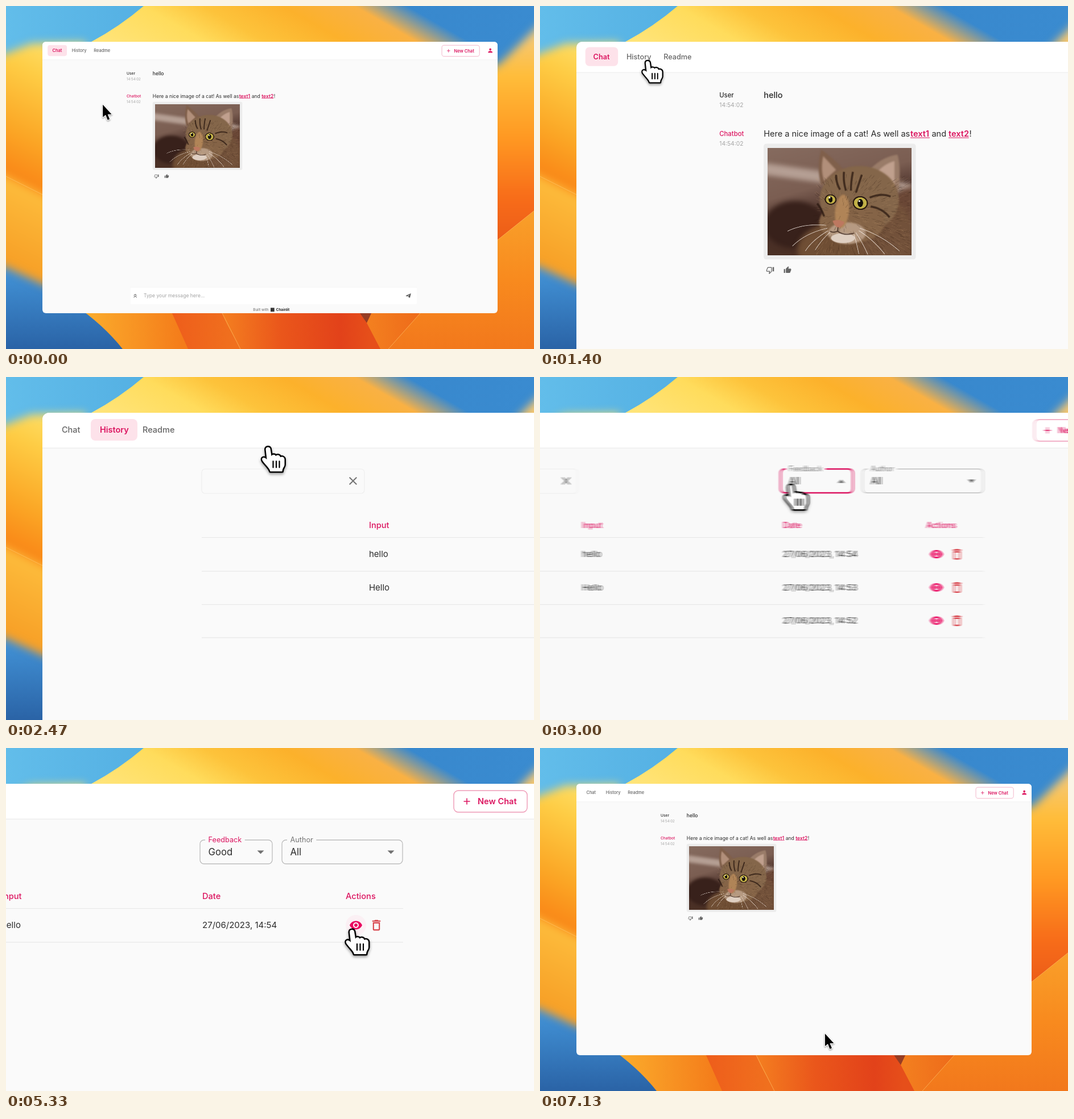
An HTML page with a canvas that plays this animation: 928x604 px, repeating every 7.19 s.

```html
<!DOCTYPE html>
<html lang="en">
<head>
<meta charset="utf-8">
<title>Chat history</title>
<style>
html, body { margin: 0; width: 100%; height: 100%; overflow: hidden; background: #3d8dd3; }
canvas { display: block; width: 928px; height: 604px; }
</style>
</head>
<body>
<canvas id="stage" width="928" height="604"></canvas>
<script>
const W = 928, H = 604, LOOP = 7190, ZOOM = 1.95, PAN = 646;
const PINK = '#dc1560', GREY = '#666', INK = '#2b2b2b', PAPER = '#fafafa';

function surface(w, h) {
  const el = document.createElement('canvas');
  el.width = w;
  el.height = h;
  return el;
}

const out = document.getElementById('stage').getContext('2d');
const layer = surface(W, H);
const c = layer.getContext('2d');

const icons = {
  like: 'M1 21h4V9H1v12zm22-11c0-1.1-.9-2-2-2h-6.31l.95-4.57.03-.32c0-.41-.17-.79-.44-1.06L14.17 1 7.59 7.59C7.22 7.95 7 8.45 7 9v10c0 1.1.9 2 2 2h9c.83 0 1.54-.5 1.84-1.22l3.02-7.05c.09-.23.14-.47.14-.73v-2z',
  dislike: 'M15 3H6c-.83 0-1.54.5-1.84 1.22l-3.02 7.05c-.09.23-.14.47-.14.73v2c0 1.1.9 2 2 2h6.31l-.95 4.57-.03.32c0 .41.17.79.44 1.06L9.83 23l6.59-6.59c.36-.36.58-.86.58-1.41V5c0-1.1-.9-2-2-2zm0 12l-4.34 4.34L12 14H3v-2l3-7h9v10zm4-12h4v12h-4z',
  person: 'M12 12c2.21 0 4-1.79 4-4s-1.79-4-4-4-4 1.79-4 4 1.79 4 4 4zm0 2c-2.67 0-8 1.34-8 4v2h16v-2c0-2.66-5.33-4-8-4z',
  send: 'M22 3 2 12l6 3 10-8-7 9 7 4z',
  eye: 'M12 4.5C7 4.5 2.73 7.61 1 12c1.73 4.39 6 7.5 11 7.5s9.27-3.11 11-7.5c-1.73-4.39-6-7.5-11-7.5zM12 17c-2.76 0-5-2.24-5-5s2.24-5 5-5 5 2.24 5 5-2.24 5-5 5zm0-8c-1.66 0-3 1.34-3 3s1.34 3 3 3 3-1.34 3-3-1.34-3-3-3z',
  bin: 'M6 19c0 1.1.9 2 2 2h8c1.1 0 2-.9 2-2V7H6v12zM8 9h8v10H8V9zm7.5-5l-1-1h-5l-1 1H5v2h14V4z',
  up: 'M6 17.59 7.41 19 12 14.42 16.59 19 18 17.59l-6-6zM6 11l1.41 1.41L12 7.83l4.59 4.58L18 11l-6-6z',
  cross: 'M19 6.4 17.6 5 12 10.6 6.4 5 5 6.4 10.6 12 5 17.6 6.4 19 12 13.4 17.6 19 19 17.6 13.4 12z',
  plus: 'M19 13h-6v6h-2v-6H5v-2h6V5h2v6h6z'
};
for (const k in icons) icons[k] = new Path2D(icons[k]);

const arrowShape = new Path2D('M0 0V22L5 18 8.5 27 12 25.5 8.5 17H15.5Z');
const handShape = new Path2D('M-4 4C-4-1 3-1 4 3L6 16C8 12 13 13 13.5 16 16 13 21 14 21.5 18 25 16 29 18 29 22V31C29 35 25 37 25 43H4C3 38-2 34-9 25-13 19-7 16-2 22Z');

function ramp(g, x0, y0, x1, y1, ...stops) {
  const r = g.createLinearGradient(x0, y0, x1, y1);
  for (const [p, col] of stops) r.addColorStop(p, col);
  return r;
}

function shape(g, d, fill) {
  g.fillStyle = fill;
  g.fill(new Path2D(d));
}

// ---- wallpaper ----
function makeWallpaper() {
  const el = surface(W, H), g = el.getContext('2d');
  g.fillStyle = ramp(g, 0, 0, W, 0, [0, '#62bdea'], [.3, '#52aee2'], [.75, '#3888cd'], [1, '#3a8bd0']);
  g.fillRect(0, 0, W, 300);
  g.fillStyle = ramp(g, 0, 460, 0, H, [0, '#4394d8'], [1, '#2a63a6']);
  g.fillRect(0, 300, W, 304);

  g.filter = 'blur(8px)';
  shape(g, 'M-60 110L0 84 45 66 140 64V520L64 490 0 460-60 440Z',
    ramp(g, 144, 92, -48, 477, [0, '#fde06a'], [.15, '#fecd45'], [.4, '#fba625'],
      [.58, '#f98516'], [.581, '#fdbc3c'], [1, '#f5961f']));
  shape(g, 'M980-10L922 48 870 100 800 140V700H980Z',
    ramp(g, 0, 50, 0, 410, [0, '#f5c877'], [.2, '#ffbd3a'], [.5, '#ff9922'], [.8, '#f76c19'], [1, '#ec5d18']));
  g.filter = 'none';

  shape(g, 'M242 0Q200 36 150 63L140 80H820V0Z',
    ramp(g, 9.9, -17.4, 173.6, -303.8, [0, '#ffe57c'], [.3, '#ffdc5c'], [.46, '#fdc33b'],
      [.67, '#fcb12b'], [.86, '#f9b144'], [1, 'rgba(240,180,90,0)']));

  shape(g, 'M120 526Q172 562 205 604H760V526Z', ramp(g, 140, 0, 310, 0, [0, '#fbac2c'], [1, '#f47c1a']));
  shape(g, 'M285 526L296 550 320 604H760V526Z', ramp(g, 290, 0, 400, 0, [0, '#ee5d1b'], [1, '#f0701e']));
  shape(g, 'M374 526L388 560 412 604H760V526Z', ramp(g, 380, 0, 640, 0, [0, '#f47f20'], [.4, '#ea561b'], [.8, '#e2421a'], [1, '#e64f1a']));
  shape(g, 'M646 526L634 558 658 604H780V526Z', ramp(g, 640, 0, 730, 0, [0, '#f37f1f'], [1, '#ee6a1a']));
  shape(g, 'M618 535L634 558 645 535Z', '#963d24');
  shape(g, 'M940 351L864 412Q790 478 728 541L672 604H940Z',
    ramp(g, 0, 360, 0, H, [0, '#f9a02a'], [.5, '#f88a1e'], [1, '#f2781c']));
  g.strokeStyle = 'rgba(255,200,110,.6)';
  g.stroke(new Path2D('M940 351L864 412Q790 478 728 541L672 604M-4 298L64 332M380 541L412 604'));
  return el;
}

// ---- the photo: soft tones and a few shapes ----
function makePhoto() {
  const k = 2, el = surface(290 * k, 217 * k), g = el.getContext('2d');
  g.scale(k, k);
  let seed = 7;
  const rnd = () => (seed = seed * 16807 % 2147483647) / 2147483647;
  const oval = (x, y, rx, ry, col, a = 0) => {
    g.fillStyle = col;
    g.beginPath();
    g.ellipse(x, y, rx, ry, a, 0, 7);
    g.fill();
  };
  g.fillStyle = ramp(g, 0, 0, 60, 217, [0, '#866b5f'], [.45, '#7b5e52'], [.7, '#4a3029'], [1, '#4b3024']);
  g.fillRect(0, 0, 290, 217);
  g.filter = 'blur(10px)';
  shape(g, 'M-20 28L290 72V95L-20 52Z', '#b59f94');
  oval(55, 155, 62, 48, '#38211b');
  oval(285, 150, 40, 70, '#6a4736');
  oval(175, 205, 115, 62, '#6f4e34');
  oval(240, 175, 55, 70, '#72513a');
  g.filter = 'blur(3px)';
  shape(g, 'M108 3Q98 40 108 76L156 46Q130 18 108 3Z', '#80604b');
  shape(g, 'M262 13Q228 18 202 48L264 88Q270 40 262 13Z', '#9a7c69');
  shape(g, 'M112 16Q106 45 114 66L138 44Z', '#b18f7a');
  shape(g, 'M256 26Q234 32 218 52L256 74Z', '#c0a08e');
  oval(185, 104, 80, 68, '#84664a');
  oval(170, 150, 66, 42, '#856447');
  oval(160, 172, 38, 22, '#b69a82');
  oval(150, 128, 14, 34, '#b08457', .1);
  g.filter = 'none';

  g.lineWidth = .8;
  for (let i = 0; i < 650; i++) {
    const x = 100 + rnd() * 185, y = 60 + rnd() * 155, a = Math.atan2(y - 130, x - 150);
    g.strokeStyle = rnd() < .5 ? 'rgba(45,27,18,.28)' : 'rgba(205,165,120,.2)';
    g.beginPath();
    g.moveTo(x, y);
    g.lineTo(x + 8 * Math.cos(a), y + 8 * Math.sin(a));
    g.stroke();
  }

  g.filter = 'blur(1px)';
  g.strokeStyle = 'rgba(42,24,16,.75)';
  g.lineWidth = 4;
  g.stroke(new Path2D('M138 54Q138 70 146 84M154 48Q152 66 158 86M172 48Q168 68 168 86M190 54Q184 72 178 90M206 100Q230 90 248 98M208 118Q232 122 246 140M100 112Q108 122 114 138'));
  g.filter = 'none';

  for (const [x, y, r] of [[127, 104, 9.5], [187, 111, 13]]) {
    oval(x, y, r + 2.5, r + 1, '#2a1a12', .1);
    oval(x, y, r, r * .88, '#c2b047', .1);
    oval(x, y, r * .42, r * .62, '#120d08');
    oval(x - 2, y - 4, 1.8, 1.8, '#f4f2e6');
  }
  g.filter = 'blur(1px)';
  shape(g, 'M131 147Q144 143 155 150Q150 160 142 161Q134 157 131 147Z', '#bd7860');
  oval(152, 182, 24, 10, '#dfcfc2');
  g.strokeStyle = '#3f281d';
  g.lineWidth = 1.8;
  g.stroke(new Path2D('M142 160L141 168Q132 172 126 168M141 168Q154 178 174 172'));
  g.filter = 'none';
  g.strokeStyle = 'rgba(250,240,232,.75)';
  g.lineWidth = 1.1;
  g.stroke(new Path2D('M118 156Q72 152 40 168M120 162Q76 172 50 198M122 167Q90 186 76 208M126 170Q108 186 96 206M186 162Q230 176 266 208M184 167Q212 184 236 214M178 171Q192 192 202 215M174 174Q180 194 184 214'));
  return el;
}

const wallpaper = makeWallpaper(), photo = makePhoto();

// ---- drawing helpers, in zoomed window units ----
function text(s, x, y, size, color, weight = 400) {
  c.font = `${weight} ${size}px Inter, "Liberation Sans", sans-serif`;
  c.fillStyle = color;
  c.fillText(s, x, y + size * .364);
}

function icon(name, x, y, size, color) {
  c.save();
  c.translate(x - size / 2, y - size / 2);
  c.scale(size / 24, size / 24);
  c.fillStyle = color;
  c.fill(icons[name], 'evenodd');
  c.restore();
}

function box(x0, y0, x1, y1, r, fill, stroke, width = 1.2) {
  c.beginPath();
  c.roundRect(x0, y0, x1 - x0, y1 - y0, r);
  if (fill) { c.fillStyle = fill; c.fill(); }
  if (stroke) { c.strokeStyle = stroke; c.lineWidth = width; c.stroke(); }
}

function bar(x0, x1, y, color) {
  c.fillStyle = color;
  c.fillRect(x0, y, x1 - x0, 1.2);
}

function header(page) {
  c.fillStyle = '#fff';
  c.fillRect(0, 0, 1560, 62);
  bar(0, 1560, 61.5, '#ececec');
  const tabs = [['Chat', 34, 18, 84], ['History', 101, 85, 167], ['Readme', 176]];
  for (const [name, x, left, right] of tabs) {
    const on = name === page;
    if (on) box(left, 11, right, 49, 8, '#fde2ea');
    text(name, x, 30, 14.5, on ? PINK : GREY, on ? 600 : 500);
  }
  box(1369, 12, 1498, 50, 8, '#fff', '#ee9ab6', 1.4);
  icon('plus', 1392, 31, 19, PINK);
  text('New Chat', 1411, 31, 14.6, PINK, 600);
  icon('person', 1535, 30, 22, PINK);
}

function messages() {
  text('User', 288.5, 108, 13, INK, 500);
  text('14:54:02', 288.5, 128, 11.8, '#a5a5a5');
  text('hello', 378, 108, 16.7, INK, 500);
  text('Chatbot', 288.5, 185.5, 13, PINK, 500);
  text('14:54:02', 288.5, 205.5, 11.8, '#a5a5a5');
  text('Here a nice image of a cat! As well as', 378, 186, 16.7, INK);
  text('text1', 674, 186, 16.7, PINK, 600);
  text('and', 717, 186, 16.7, INK);
  text('text2', 751, 186, 16.7, PINK, 600);
  text('!', 793, 186, 16.7, INK);
  bar(674, 713, 193.5, PINK);
  bar(751, 792, 193.5, PINK);
  box(378, 206, 685, 440, 5, '#ececec');
  c.drawImage(photo, 386, 215, 290, 217);
  icon('dislike', 391, 462, 17, GREY);
  icon('like', 426, 461.5, 16, GREY);
}

function composer() {
  box(302, 844, 1283, 901, 4, '#fff');
  bar(302, 1283, 842, '#f1f1f1');
  icon('up', 318, 872, 22, '#555');
  text('Type your message here...', 347, 872, 16.7, '#a3a3a3');
  icon('send', 1254, 872, 22, '#555');
  text('Built with', 722, 920, 12.3, '#666');
  box(782, 913.5, 795, 926.5, 0, '#333');
  text('Chainlit', 801, 920, 12.3, '#2b2b2b', 700);
}

function caret(x, y, open) {
  const d = open ? -3 : 3;
  c.fillStyle = '#707070';
  c.beginPath();
  c.moveTo(x - 6, y - d);
  c.lineTo(x + 6, y - d);
  c.lineTo(x, y + d);
  c.fill();
}

function select(x0, x1, label, value, hot, focus, open) {
  box(x0, 99, x1, 141, 7, null, focus ? PINK : '#bdbdbd', focus ? 2.4 : 1.3);
  c.font = '400 12.7px Inter, "Liberation Sans", sans-serif';
  c.fillStyle = PAPER;
  c.fillRect(x0 + 9, 95, c.measureText(label).width + 11, 8);
  text(label, x0 + 14.5, 98.5, 12.7, hot ? PINK : '#757575');
  text(value, x0 + 14.5, 120, 16.7, INK);
  caret(x1 - 20.5, 120.5, open);
}

function history(t) {
  const filtered = t > 4050, open = t > 2900 && t < 4000;
  box(280, 99, 566, 142, 6, null, '#efefef');
  icon('cross', 546, 120, 24, '#757575');
  select(923, 1050, 'Feedback', t > 4000 ? 'Good' : 'All', t > 3060, open, open);
  select(1067, 1279, 'Author', 'All');
  text('Input', 574, 198, 14.6, PINK, 500);
  text('Date', 927, 198, 14.6, PINK, 500);
  text('Actions', 1179, 198, 14.6, PINK, 500);
  bar(280, 1280, 219, '#e8e8e8');
  [['hello', 4], ['Hello', 3], ['', 2]].slice(0, filtered ? 1 : 3).forEach(([input, n], i) => {
    const y = 249 + i * 58.5;
    text(input, 574, y, 15, INK);
    text('27/06/2023, 14:5' + n, 927, y, 15, INK);
    if (i === 0 && t > 5000) {
      c.beginPath();
      c.arc(1197, y, 18, 0, 7);
      c.fillStyle = '#fbf0f4';
      c.fill();
    }
    icon('eye', 1197, y, 24, '#ea0a60');
    icon('bin', 1233, y, 25, '#d8444c');
    bar(280, 1280, y + 29.5, '#e8e8e8');
  });
  const show = Math.min(ease(t, 3060, 200), 1 - ease(t, 4000, 150));
  if (show > 0) menu(show);
}

function menu(alpha) {
  c.save();
  c.globalAlpha = alpha;
  c.shadowColor = 'rgba(0,0,0,.22)';
  c.shadowBlur = 12;
  c.shadowOffsetY = 4;
  box(923, 145, 1050, 281, 6, '#fff');
  c.shadowColor = 'transparent';
  c.fillStyle = '#fde8ee';
  c.fillRect(923, 153, 127, 40);
  ['All', 'Good', 'Bad'].forEach((s, i) => text(s, 940, 173 + i * 40, 16.7, INK));
  c.restore();
}

// ---- motion ----
function ease(t, start, length) {
  const x = Math.min(1, Math.max(0, (t - start) / length));
  return x < .5 ? 4 * x ** 3 : 1 - 4 * (1 - x) ** 3;
}

function camera(t) {
  const back = 1 - ease(t, 5450, 870);
  return {
    s: 1 + (ZOOM - 1) * ease(t, 1020, 640) * back,
    pan: PAN * ease(t, 2450, 805) * back
  };
}

const track = [
  [0, 207, 216], [150, 207, 216], [960, 164, 51], [1150, 164, 51], [1650, 124, 27], [2200, 124, 27],
  [2900, 941, 127], [3250, 941, 127], [3800, 955, 212], [4420, 955, 212], [5150, 1190, 257],
  [5700, 1190, 257], [6100, 1198, 249], [6250, 1198, 249], [7050, 852, 858], [LOOP, 852, 858]
];

function pointer(t, s) {
  let i = 1;
  while (track[i][0] < t) i++;
  const [t0, x0, y0] = track[i - 1], [t1, x1, y1] = track[i];
  const u = (t - t0) / (t1 - t0), p = u * u * (3 - 2 * u);
  const hand = t > 1400 && t < 6420;
  c.save();
  c.translate(x0 + (x1 - x0) * p, y0 + (y1 - y0) * p);
  if (!hand) c.scale(ZOOM, ZOOM);
  c.lineJoin = c.lineCap = 'round';
  c.shadowColor = 'rgba(0,0,0,.4)';
  c.shadowBlur = 2.5 * s;
  c.shadowOffsetY = 1.3 * s;
  if (hand) {
    c.strokeStyle = '#000';
    c.lineWidth = 5;
    c.stroke(handShape);
    c.shadowColor = 'transparent';
    c.fillStyle = '#fff';
    c.fill(handShape);
    c.lineWidth = 2.2;
    c.stroke(new Path2D('M9 25V36M14.5 25V36M20 25V36'));
  } else {
    c.strokeStyle = '#fff';
    c.lineWidth = 2.4;
    c.stroke(arrowShape);
    c.shadowColor = 'transparent';
    c.fillStyle = '#000';
    c.fill(arrowShape);
  }
  c.restore();
}

function draw(t) {
  const { s, pan } = camera(t);
  const page = t < 2130 ? 'Chat' : t < 5600 ? 'History' : 'View';
  c.clearRect(0, 0, W, H);
  c.save();
  c.translate(64 - pan, 63);
  c.scale(s / ZOOM, s / ZOOM);
  c.save();
  c.beginPath();
  c.roundRect(0, 0, 1560, 932, 12);
  c.clip();
  c.fillStyle = PAPER;
  c.fillRect(0, 0, 1560, 932);
  header(page);
  if (page === 'History') history(t);
  else messages();
  if (page === 'Chat') composer();
  c.restore();
  pointer(t, s);
  c.restore();

  out.drawImage(wallpaper, 0, 0);
  out.drawImage(layer, 0, 0);
  // sideways motion blur while the view pans
  const v = t < 5400 ? pan - camera(t - 8).pan : 0;
  if (v > .5) {
    for (let i = 1; i < 6; i++) {
      out.globalAlpha = 1 / (i + 1);
      out.drawImage(layer, (i % 2 ? 1 : -1) * Math.ceil(i / 2) * v / 6, 0);
    }
    out.globalAlpha = 1;
  }
}

const begin = performance.now();
function tick() {
  draw((performance.now() - begin) % LOOP);
  requestAnimationFrame(tick);
}
tick();
</script>
</body>
</html>
```
